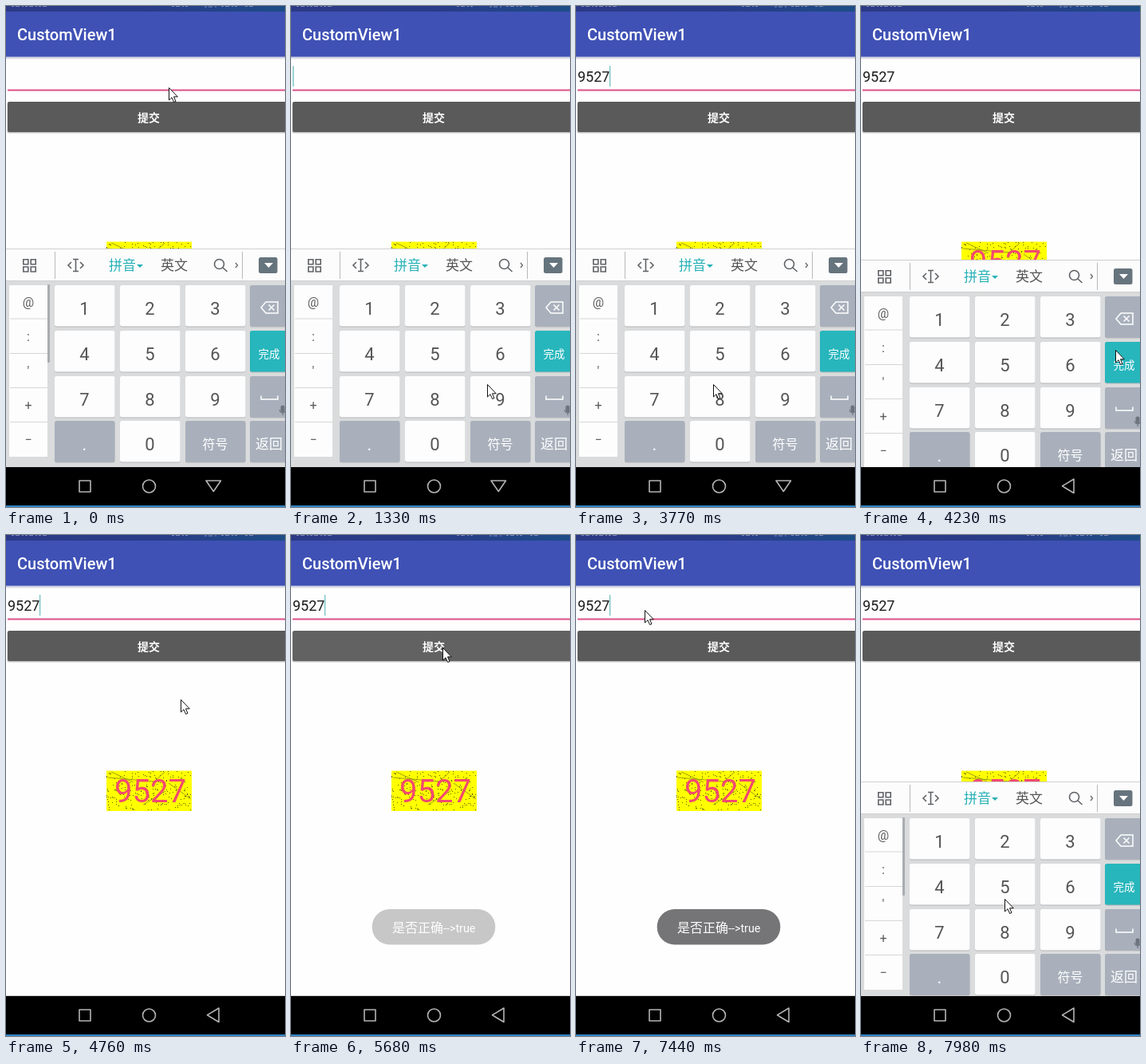
Animation, 350 px wide and 628 px high, one loop 8 s. Source, as an HTML page:

```html
<!DOCTYPE html>
<html lang="zh">
<head>
<meta charset="utf-8">
<title>Captcha input</title>
<style>
html, body { margin: 0; width: 100%; height: 100%; overflow: hidden; background: #fefefe; }
svg { display: block; width: 350px; height: 628px; }
text { font-family: Roboto, "Noto Sans CJK SC", "Noto Sans CJK", sans-serif; }
.mid { text-anchor: middle; }
.line { fill: none; stroke: #5f6266; stroke-width: 1.6; }
.white { fill: none; stroke: #fff; stroke-width: 1.5; }
.nav { fill: none; stroke: #b4b4b4; stroke-width: 1.6; stroke-linejoin: round; }
</style>
</head>
<body>
<svg viewBox="0 0 350 628">
  <defs>
    <linearGradient id="bar">
      <stop offset="0" stop-color="#2c3a86"/>
      <stop offset=".55" stop-color="#293d88"/>
      <stop offset="1" stop-color="#1d4d86"/>
    </linearGradient>
    <linearGradient id="shade" x2="0" y2="1">
      <stop offset="0" stop-color="#b4b8d2"/>
      <stop offset="1" stop-color="#fefefe"/>
    </linearGradient>
    <clipPath id="screen"><rect width="350" height="578"/></clipPath>
  </defs>
  <rect width="350" height="628" fill="#fefefe"/>

  <rect y="63" width="350" height="4.5" fill="url(#shade)"/>
  <rect y="7" width="350" height="56.5" fill="#3f51b5"/>
  <rect width="350" height="7" fill="url(#bar)"/>
  <path d="M7 .5H54M208 .5H228M249 1H264M270 .5H292M300 .5H313" stroke="#aab2d4" stroke-opacity=".65" stroke-dasharray="3 2 5 3 2 2"/>
  <text x="14" y="43" font-size="20" font-weight="500" fill="#fff">CustomView1</text>

  <text id="field" x="2" y="95" font-size="18" fill="#1c1c1c"></text>
  <rect x="2" y="104.5" width="348" height="2" fill="#dd508a"/>
  <rect id="caret" y="75" width="1.6" height="26" fill="#85c8ca"/>

  <rect x="1.5" y="121" width="352" height="38.5" rx="2" fill="#c4c4c4"/>
  <rect id="button" x="2" y="120" width="352" height="38" rx="2"/>
  <text class="mid" x="179" y="145" font-size="14" font-weight="700" fill="#fff">提交</text>

  <g id="captcha">
    <rect x="126" y="295.5" width="107" height="50.500" fill="#ff0"/>
    <path id="dots" stroke="#33330c" stroke-width=".8"/>
    <path d="M132 297L160 310M128 304L186 309M204 311L232 331M186 309L199 297M172 338L200 321" fill="none" stroke="#77771c" stroke-width=".7"/>
    <text class="mid" x="181" y="335" font-size="40" fill="#f4496f">9527</text>
  </g>

  <g id="toast">
    <rect x="101.7" y="469" width="154.6" height="44.5" rx="22" fill="#6a696b"/>
    <text x="127" y="497.500" font-size="16" fill="#fff">是否正确<tspan font-size="14.3">--&gt;true</tspan></text>
  </g>

  <g clip-path="url(#screen)">
    <g id="board">
      <rect y="304" width="350" height="275" fill="#dadbdc"/>
      <rect y="304" width="350" height="41" fill="#fcfcfc"/>
      <path d="M0 304.5H350M0 344.5H350" stroke="#d0d0d0"/>
      <path d="M61.5 308V342M296.5 308V342" stroke="#b9b9b9"/>
      <path class="line" d="M21.8 317.8h6v6h-6zM31.2 317.8h6v6h-6zM21.8 327h6v6h-6zM31.2 327h6v6h-6z"/>
      <path class="line" d="M82 321L78 325L82 329M93 321L97 325L93 329M87.5 318V332M84 317.5H91M84 332.5H91"/>
      <text x="129" y="331" font-size="17" font-weight="500" fill="#25b1b7">拼音</text>
      <path d="M164 324h8l-4 4z" fill="#25b1b7"/>
      <text x="194" y="331" font-size="17" fill="#555">英文</text>
      <circle class="line" cx="267.5" cy="323.5" r="6"/>
      <path class="line" d="M272 328L277.5 333"/>
      <path class="line" d="M288 322l2.5 3l-2.5 3" style="stroke-width:1.2"/>
      <rect x="317" y="315" width="23.500" height="20" rx="2.5" fill="#66747e"/>
      <path d="M324 322h11l-5.5 6z" fill="#fff"/>
      <rect x="4" y="350" width="48" height="215" fill="#fdfdfd"/>
      <path d="M5 392H52M5 435.5H52M5 478.5H52M5 521.5H52" stroke="#d6d6d6"/>
      <rect id="scroll" x="52" y="349" width="3" height="98" rx="1" fill="#a9acb0"/>
      <g id="keys"></g>
      <path class="white" d="M320 378l6-7h15v14h-15zM329.5 374.5l7 7M336.5 374.5l-7 7"/>
      <path class="white" d="M320 488.5v4.5h21v-4.5"/>
      <path d="M344.5 503a2.5 2.5 0 0 1 5 0v4a2.5 2.5 0 0 1-5 0zM346.5 510h1.2v3h-1.2z" fill="#6d747d"/>
      <path d="M343 506a4 4 0 0 0 8 0" fill="none" stroke="#6d747d"/>
    </g>
  </g>

  <rect y="578" width="350" height="48" fill="#000"/>
  <rect y="626" width="350" height="2" fill="#2f83c4"/>
  <rect class="nav" x="92" y="595" width="14" height="14"/>
  <circle class="nav" cx="179.5" cy="602" r="8"/>
  <path id="back" class="nav"/>

  <path id="mouse" d="M.5 .5V16L4 12.7L6.6 18.5L9 17.5L6.5 11.8H11.3Z" fill="#fff" stroke="#111"/>
</svg>
<script>
const LOOP = 8000;
const $ = id => document.getElementById(id);
const clamp = v => Math.max(0, Math.min(1, v));
const part = (t, from, span) => clamp((t - from) / span);

const bursts = [[0, 120, 2], [390, 520, 2], [820, 1720, 8], [2020, 2980, 8], [3110, 4070, 8],
  [4230, 5010, 7], [5440, 5680, 3], [5820, 6470, 5], [6620, 7580, 8], [7710, 7980, 3]];
const ticks = bursts.flatMap(([a, b, n]) =>
  Array.from({ length: n }, (_, i) => Math.round((a + (b - a) * i / (n - 1)) / 10) * 10));

// Mouse path: time, x, y
const path = [[0, 204, 102], [780, 204, 102], [1330, 246, 474], [1600, 264, 485], [2020, 264, 485],
  [2330, 183, 435], [2500, 183, 435], [2720, 183, 378], [2850, 181, 380], [3110, 95, 487],
  [3250, 97, 496], [3450, 97, 496], [3990, 319, 431], [4300, 319, 431], [4950, 190, 141],
  [6600, 190, 141], [7440, 86, 94], [7640, 86, 94], [7980, 180, 456]];

const presses = [1650, 2400, 2800, 3350];

function mouseAt(t) {
  const i = path.findIndex(p => p[0] > t);
  if (i < 0) return path[path.length - 1].slice(1);
  const [a, b] = [path[i - 1], path[i]];
  const p = part(t, a[0], b[0] - a[0]);
  const e = p * p * (3 - 2 * p);
  return [a[1] + (b[1] - a[1]) * e, a[2] + (b[2] - a[2]) * e];
}

function boardShift(t) {
  const p = t < 6000 ? part(t, 4162, 300) : 1 - part(t, 7720, 300);
  return Math.round(273 * p * p);
}

function buildKeys() {
  const rows = [["1", "2", "3", ""], ["4", "5", "6", "完成"], ["7", "8", "9", ""], [".", "0", "符号", "返回"]];
  const tops = [350, 407, 464, 520], lefts = [61, 143, 225, 306];
  let out = "";
  rows.forEach((row, r) => row.forEach((label, c) => {
    const x = lefts[c], y = tops[r], plain = label >= "0" && label <= "9";
    const fill = plain ? "#fdfdfd" : label === "完成" ? "#27b6bc" : "#a9b0bc";
    const size = plain || label === "." ? 22 : label === "完成" ? 13.5 : label === "返回" ? 17 : 16;
    const cx = c === 3 ? 330 : x + 37.5;
    out += `<rect x="${x}" y="${y + 1}" width="75.5" height="51.5" rx="2.5" fill="#b3b6ba"/>
      <rect x="${x}" y="${y}" width="75.5" height="51.5" rx="2.5" fill="${fill}"/>
      <text class="mid" x="${cx}" y="${y + 29 + size * .36}" font-size="${size}" fill="${plain ? "#555" : "#fff"}">${label}</text>`;
  }));
  [..."@:'+−"].forEach((s, i) => {
    out += `<text class="mid" x="28" y="${377 + 43 * i}" font-size="16" fill="#5c5c5c">${s}</text>`;
  });
  $("keys").innerHTML = out;
}

function buildDots() {
  let seed = 77, d = "";
  const rand = () => (seed = seed * 16807 % 2147483647) / 2147483647;
  for (let i = 0; i < 200; i++) {
    d += `M${126 + Math.floor(rand() * 106)} ${296.5 + Math.floor(rand() * 49)}h1`;
  }
  $("dots").setAttribute("d", d);
}

function draw(now) {
  const raw = now % LOOP;
  const t = ticks.filter(k => k <= raw).pop();
  const move = (id, x, y) => $(id).setAttribute("transform", `translate(${x} ${y})`);
  const show = (id, on) => $(id).setAttribute("opacity", +on);

  const typed = presses.filter(p => p <= t);
  const n = typed.length;
  const blinkFrom = n ? typed[n - 1] : 20;
  $("field").textContent = "9527".slice(0, n);
  $("caret").setAttribute("x", 2 + n * 9.95);
  show("caret", t >= 20 && (t - blinkFrom) % 1000 < 500);

  $("button").setAttribute("fill", t >= 5440 && t < 5950 ? "#626263" : "#5a5a5b");
  show("toast", t < 6500 ? part(t, 5520, 440) : 1 - part(t, 7300, 500) ** 2);
  show("scroll", t < 820 || t > 7600);
  move("board", 0, boardShift(t));
  $("back").setAttribute("d", t < 4160 ? "M251 595H269.5L260.3 608.5Z" : "M267 593V610.5L252.5 601.8Z");

  const [x, y] = mouseAt(t);
  move("mouse", Math.round(x), Math.round(y));
}

buildKeys();
buildDots();
const start = performance.now();
function tick() {
  draw(performance.now() - start);
  requestAnimationFrame(tick);
}
tick();
</script>
</body>
</html>
```
